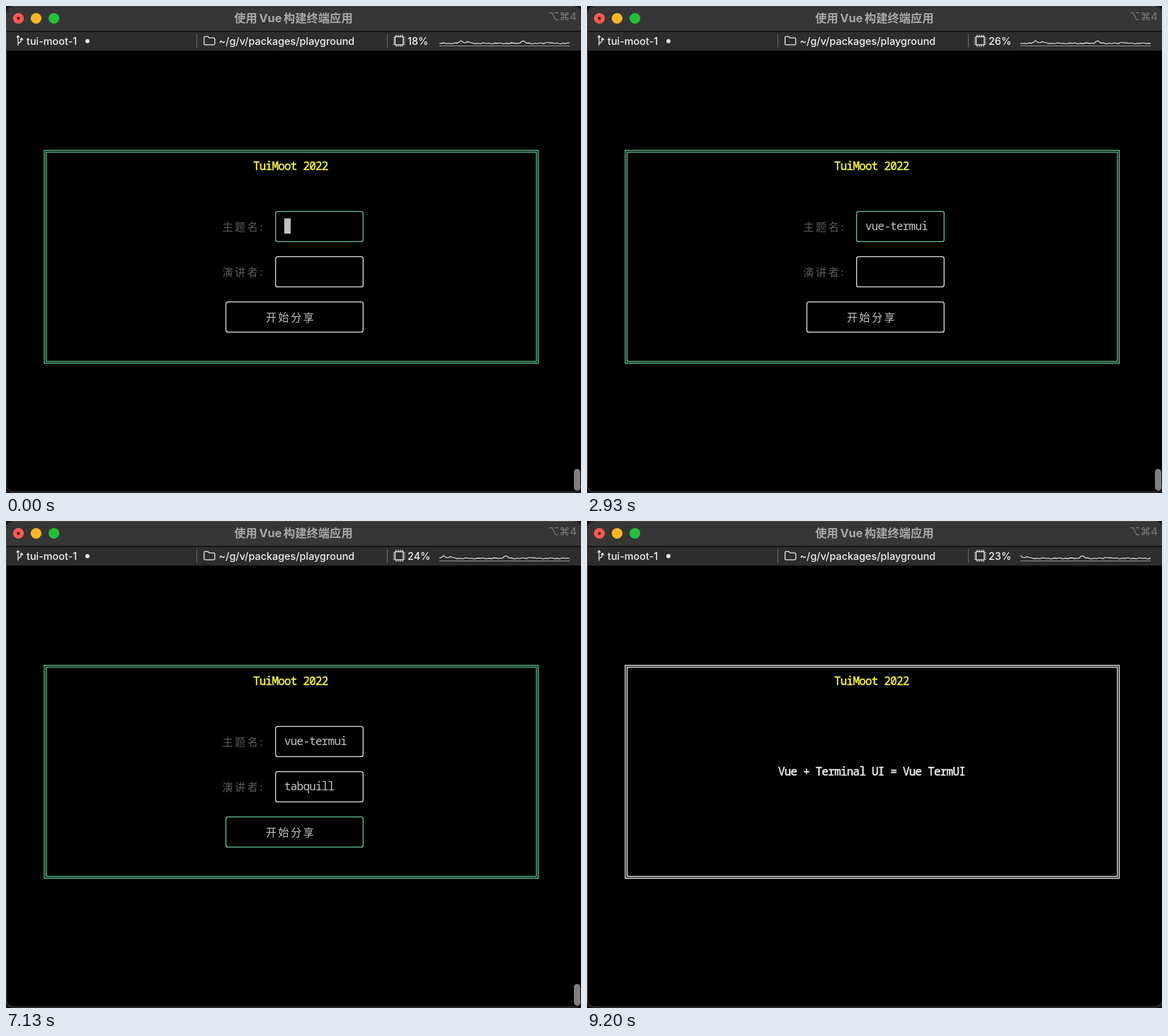
Write an HTML page that moves like this. It is 812x689 px and loops after 9540 ms.

```html
<!DOCTYPE html>
<html lang="zh">
<head>
<meta charset="utf-8">
<title>Terminal form</title>
<style>
html, body { margin: 0; width: 812px; height: 689px; overflow: hidden; background: #17131b; }
svg { display: block; }
text { white-space: pre; }
.ui { font: 500 14.4px Inter, sans-serif; fill: #f0f0f0; }
.mono { font: 16px "Noto Sans Mono", monospace; letter-spacing: -.8px; fill: #c4c4c4; }
.strong { stroke-width: .45; }
.cjk { font: 300 15px "Noto Sans CJK SC", "Noto Sans CJK", sans-serif; letter-spacing: 2.6px; fill: #c4c4c4; }
.dim { fill: #5c5c5c; }
.line { fill: none; stroke-width: 1.3; }
</style>
</head>
<body>
<svg width="812" height="689" viewBox="0 0 812 689">
  <rect x=".5" y=".5" width="812" height="687" rx="10" stroke="#484848"/>
  <path d="M1 36V11A10 10 0 0 1 11 1H802A10 10 0 0 1 812 11V36Z" fill="#363636"/>
  <path d="M1 36H812" stroke="#151515" stroke-width="2"/>
  <path d="M1 37H812V63H1Z" fill="#2d2d2d"/>

  <circle cx="17.5" cy="17.5" r="7.6" fill="#ff5b51"/>
  <circle cx="17.5" cy="17.5" r="2.2" fill="#6c0c07"/>
  <circle cx="42.5" cy="17.5" r="7.6" fill="#fdb424"/>
  <circle cx="67.7" cy="17.5" r="7.6" fill="#24c138"/>
  <text x="406" y="22.6" text-anchor="middle" fill="#a9a9a9" style="font:700 16.3px Inter,'Noto Sans CJK SC','Noto Sans CJK',sans-serif">使用&#8201;Vue&#8201;构建终端应用</text>
  <text x="806" y="20" text-anchor="end" fill="#7c7c7c" style="font:15px Inter,'DejaVu Sans',sans-serif">⌥⌘4</text>

  <g fill="none" stroke="#e6e6e6" stroke-width="1.3">
    <path d="M17 42V56M17 52.5Q22 52 22 46M15 44.5L17 42L19 44.5M20 48L22 45.5L24 48"/>
    <path d="M279.7 54V44.5Q279.7 43.2 281 43.2H285L287 45.2H293.5Q294.8 45.2 294.8 46.5V53.5Q294.8 54.8 293.5 54.8H281Q279.7 54.8 279.7 54Z"/>
    <rect x="549.5" y="43.5" width="11.4" height="11.4"/>
    <path d="M550.4 42H561M550.4 56.4H561M548 44.4V55M562.4 44.4V55" stroke-width="2.4" stroke-dasharray="1.2 1.8"/>
  </g>
  <path d="M269.5 40V59M538.5 40V59" stroke="#6a6a6a"/>
  <text class="ui" x="29" y="54.5">tui-moot-1</text>
  <circle cx="115" cy="49.7" r="2.9" fill="#e6e6e6"/>
  <text class="ui" x="300.5" y="54.5">~/g/v/packages/playground</text>
  <text class="ui" x="567" y="54.5" id="cpu"></text>
  <path d="M612 56.5H796" stroke="#929292"/>
  <path id="spark" fill="none" stroke="#e8e8e8" stroke-width="1.1"/>

  <g id="frame" class="line">
    <rect x="54" y="204.3" width="697.6" height="301.1"/>
    <rect x="56.6" y="206.8" width="692.4" height="296"/>
  </g>
  <text class="mono strong" x="349" y="231.6" style="fill:#f5f543;stroke:#f5f543">TuiMoot 2022</text>

  <g id="form">
    <text class="cjk dim" x="305.5" y="317.5">主题名:</text>
    <text class="cjk dim" x="305.5" y="381.5">演讲者:</text>
    <rect class="line box" x="380.7" y="290.6" width="123.6" height="42.8" rx="3"/>
    <rect class="line box" x="380.7" y="354.6" width="123.6" height="42.8" rx="3"/>
    <rect class="line box" x="310.5" y="418.6" width="193.8" height="42.8" rx="3"/>
    <text class="mono field" x="393" y="317.4"></text>
    <text class="mono field" x="393" y="381.4"></text>
    <rect id="cursor" width="9" height="21.6" fill="#c0c0c0"/>
    <text class="cjk" x="367" y="445.5">开始分享</text>
  </g>
  <text class="mono strong" id="talk" x="270" y="359.6" style="fill:#f2f2f2;stroke:#f2f2f2">Vue + Terminal UI = Vue TermUI</text>

  <rect id="thumb" x="802" y="655" width="9" height="30.5" rx="4.5" fill="#808080"/>
</svg>
<script>
const LOOP = 9540, CELL = 8.8, TICK = 184 / 60, BLINK = 667;
const SUBMIT = 6600, DONE = 7200, FADE = 8800;
const GREEN = '#62c496', WHITE = '#e0e0e0';

// blink: when the cursor's on phase begins; first, gap: typing rhythm
const inputs = [
  { word: 'vue-termui', blink: 200 - BLINK, first: 1330, gap: 163 },
  { word: 'tabquill', blink: 3200, first: 4200, gap: 257 }
];
// position and height of the sparkline's peaks
const peaks = [[10.2, 4], [13.2, 2.4], [38.4, 4], [50, 1.8]];

const $ = id => document.getElementById(id);
const boxes = document.querySelectorAll('.box');
const fields = document.querySelectorAll('.field');
const clamp = (v, max) => Math.max(0, Math.min(max, v));
const show = (el, on) => el.style.display = on ? '' : 'none';

const typed = ({ word, first, gap }, t) => clamp(Math.floor((t - first) / gap) + 1, word.length);
const load = n => Math.round(23.45 - 5.85 * Math.cos(1.3 * n) * Math.exp(-.24 * n));

function level(i) {
  const noise = Math.sin(i * 2.4) * .55 + Math.sin(i * 5.3) * .4;
  return peaks.reduce((y, [at, h]) => y - h * Math.max(0, 1 - Math.abs(i - at) / 1.8), 52.8 + noise);
}

function sparkline(shift) {
  const points = Array.from({ length: 61 }, (_, i) => [612 + i * TICK, level(i + shift)]);
  return 'M' + points.map(p => p.map(v => v.toFixed(2)).join(' ')).join('L');
}

function draw(t) {
  const second = Math.floor((t + 870) / 1000);
  const focus = t < inputs[1].blink ? 0 : t < SUBMIT ? 1 : 2;
  const input = inputs[focus];
  const done = t >= DONE;

  $('cpu').textContent = load(second) + '%';
  $('spark').setAttribute('d', sparkline(second));
  $('frame').style.stroke = done ? '#f0f0f0' : GREEN;
  $('thumb').style.opacity = 1 - clamp((t - FADE) / 130, 1);
  show($('form'), !done);
  show($('talk'), done);

  boxes.forEach((box, i) => box.style.stroke = i === focus ? GREEN : WHITE);
  fields.forEach((field, i) => {
    field.textContent = inputs[i].word.slice(0, typed(inputs[i], t));
  });
  show($('cursor'), input && Math.floor((t - input.blink) / BLINK) % 2 === 0);
  if (input) {
    $('cursor').setAttribute('x', 393 + typed(input, t) * CELL);
    $('cursor').setAttribute('y', 300.4 + focus * 64);
  }
}

const start = performance.now();
function loop() {
  draw((performance.now() - start) % LOOP);
  requestAnimationFrame(loop);
}
loop();
</script>
</body>
</html>
```
